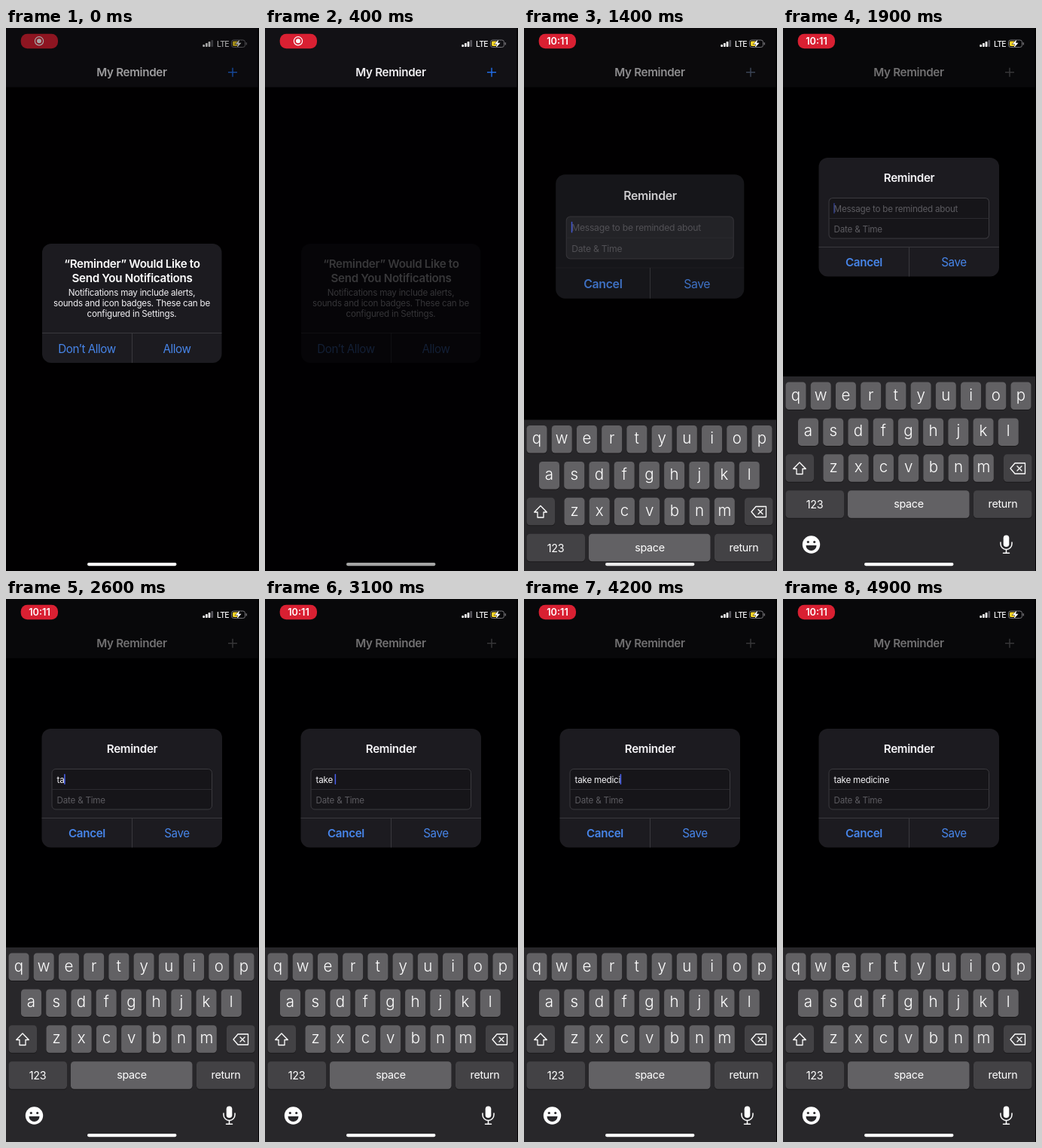
Recreate the animation shown at these times as an HTML page with a canvas. Size 336x720 px, loop 5 s.

```html
<!DOCTYPE html>
<html lang="en">
<head>
<meta charset="utf-8">
<title>My Reminder</title>
<style>
  html, body { margin: 0; width: 100%; height: 100%; overflow: hidden; background: #000; }
  canvas { display: block; width: 336px; height: 720px; }
</style>
</head>
<body>
<canvas id="stage"></canvas>
<script>
const W = 336, H = 720, LOOP = 5000, STEP = 100;
const canvas = document.getElementById('stage');
const ctx = canvas.getContext('2d');
const dpr = window.devicePixelRatio || 1;
canvas.width = W * dpr;
canvas.height = H * dpr;

const BLUE = '#4785e9', PANEL = '#1c1b20', LINE = '#39383d';
const FONT = 'Inter, "Liberation Sans", sans-serif';
const MESSAGE = 'take medicine';
const OPEN_AT = 1244, TYPE_AT = 2430, KEY_MS = 165;

const clamp = (v, a = 0, b = 1) => Math.min(b, Math.max(a, v));
const ramp = (t, a, b) => clamp((t - a) / (b - a));
const mix = (a, b, p) => a + (b - a) * p;
const rgb = (...c) => `rgb(${c.map(Math.round).join(',')})`;
const mixRgb = (a, b, p) => rgb(...a.map((v, i) => mix(v, b[i], p)));

// Critically damped spring from 0 to 1
function spring(ms) {
  const x = Math.max(0, ms) * 0.01826;
  return 1 - (1 + x) * Math.exp(-x);
}

function box(x, y, w, h, r, fill, stroke) {
  ctx.beginPath();
  ctx.roundRect(x, y, w, h, r);
  if (fill) { ctx.fillStyle = fill; ctx.fill(); }
  if (stroke) { ctx.strokeStyle = stroke; ctx.lineWidth = 1; ctx.stroke(); }
}

function disc(x, y, r, fill) {
  ctx.beginPath();
  ctx.arc(x, y, r, 0, Math.PI * 2);
  ctx.fillStyle = fill;
  ctx.fill();
}

function path(points, close) {
  ctx.beginPath();
  points.forEach(([x, y]) => ctx.lineTo(x, y));
  if (close) ctx.closePath();
}

function line(x1, y1, x2, y2, color, width = 1) {
  path([[x1, y1], [x2, y2]]);
  ctx.strokeStyle = color;
  ctx.lineWidth = width;
  ctx.stroke();
}

function text(str, x, y, size, color, { weight = 400, align = 'center', track = 0 } = {}) {
  ctx.font = `${weight} ${size}px ${FONT}`;
  ctx.letterSpacing = track + 'px';
  ctx.textAlign = align;
  ctx.fillStyle = color;
  ctx.fillText(str, x, y);
  return ctx.measureText(str).width;
}

const heading = (str, x, y, color) =>
  text(str, x, y, 15.2, color, { weight: 600, track: -0.33 });
const action = (str, x, y) =>
  text(str, x, y, 15.2, BLUE, { track: -0.45 });
const small = (str, x, y, color, align = 'left') =>
  text(str, x, y, 11.65, color, { align, track: -0.23 });

// Draws with opacity relative to the enclosing layer
function layer(alpha, draw) {
  ctx.save();
  ctx.globalAlpha *= alpha;
  draw();
  ctx.restore();
}

function drawHeader(plus) {
  box(0, 0, 334.5, 78.5, 0, '#121115');
  heading('My Reminder', 167, 64, '#f0eff2');
  line(295, 58.7, 307, 58.7, plus, 1.4);
  line(301, 52.7, 301, 64.7, plus, 1.4);
}

function drawStatus(t) {
  box(19.7, 7.7, 49.3, 19.5, 8.5, '#d92032');
  const clock = ramp(t, 800, 1000);
  layer(1 - clock, () => {
    ctx.beginPath();
    ctx.arc(44, 17.3, 5.6, 0, Math.PI * 2);
    ctx.strokeStyle = '#fff';
    ctx.lineWidth = 1.2;
    ctx.stroke();
    disc(44, 17.3, 3, '#fff');
  });
  layer(clock, () => text('10:11', 44.5, 21.8, 12.7, '#fff', { weight: 600 }));

  for (let i = 0; i < 4; i++) {
    const h = 3 + i * 2;
    box(261.3 + i * 3.7, 25 - h, 2.7, h, 0.7, i < 3 ? '#fff' : '#55545a');
  }
  text('LTE', 280, 24.5, 10.5, '#f4f4f5', { weight: 500, align: 'left', track: -0.75 });

  box(299.5, 16, 18, 9.5, 2.8, null, '#77767a');
  box(301, 17.5, 8, 6.5, 1.4, '#f5d327');
  box(318.7, 19, 1.3, 3.5, 0.6, '#77767a');
  path([[310.5, 15], [304.5, 21.5], [308, 21.5], [306.5, 26.5], [312.5, 19.8], [309, 19.8]], true);
  ctx.strokeStyle = '#111';
  ctx.lineWidth = 1;
  ctx.stroke();
  ctx.fillStyle = '#fff';
  ctx.fill();
}

function drawPermission() {
  box(48, 286, 238.5, 158, 12, PANEL);
  heading('“Reminder” Would Like to', 167.5, 318, '#fff');
  heading('Send You Notifications', 167.5, 337, '#fff');
  ['Notifications may include alerts,', 'sounds and icon badges. These can be', 'configured in Settings.']
    .forEach((s, i) => small(s, 167, 355 + i * 14, '#f2f1f4', 'center'));
  line(48, 404.5, 286.5, 404.5, LINE);
  line(167.5, 404.5, 167.5, 444, LINE);
  action('Don’t Allow', 107.5, 430.5);
  action('Allow', 227, 430.5);
}

// Solid after each key, then a one second blink
function caretAlpha(ms) {
  const p = ms % 1000;
  return ms < 0 ? 1 : p < 500 ? 1 - ramp(p, 400, 480) : ramp(p, 850, 1000);
}

function drawForm(t, open) {
  const settle = ramp(open, 0.7, 1);
  box(47.5, 172, 239.5, 157.5, 12, PANEL);
  heading('Reminder', 167.5, 204, '#f6f5f8');
  box(61, 225.5, 212.5, 53.5, 5, mixRgb([61, 60, 64], [22, 21, 25], ramp(open, 0.5, 1)), '#3b3a3f');
  line(61, 252.5, 273.5, 252.5, '#2c2b30');

  const typed = clamp(1 + Math.floor((t - TYPE_AT) / KEY_MS), 0, MESSAGE.length);
  let width = 0;
  if (typed) width = small(MESSAGE.slice(0, typed), 67.6, 243.5, '#f4f3f6');
  else small('Message to be reminded about', 67.6, 243.5, '#5c5b60');
  const lastKey = typed ? TYPE_AT + (typed - 1) * KEY_MS : 1460;
  layer(caretAlpha(t - lastKey), () => box(67.2 + width, 232, 1.5, 14, 0.7, '#4a62f0'));
  small('Date & Time', 67.6, 270.5, '#5c5b60');

  layer(settle, () => line(47.5, 290.5, 287, 290.5, LINE));
  line(167.5, 290.5, 167.5, 329.5, LINE);
  heading('Cancel', 107.5, 316, BLUE);
  action('Save', 227, 316);
}

function key(x, y, w, fill) {
  box(x, y + 1, w, 36.5, 4.5, '#1a191b');
  box(x, y, w, 36.5, 4.5, fill);
}

function drawKeyboard() {
  const light = '#626164', dark = '#434245';
  box(0, 462, 335, 260, 0, '#28272a');
  ['qwertyuiop', 'asdfghjkl', 'zxcvbnm'].forEach((row, r) => {
    const y = 469.5 + r * 47.9;
    [...row].forEach((ch, i) => {
      const x = [17, 33.5, 67][r] + i * 33.22;
      key(x - 13.5, y, 27, light);
      text(ch, x, y + 24, 20.5, '#fff', { weight: 300 });
    });
  });
  key(3.5, 565.3, 37.5, dark);
  key(293, 565.3, 37.5, dark);
  key(3.5, 613.2, 77.5, dark);
  key(86, 613.2, 161.5, light);
  key(253, 613.2, 77.5, dark);
  const label = { track: -0.3 };
  text('123', 42, 637, 14.3, '#fff', label);
  text('space', 167, 636, 14.3, '#fff', label);
  text('return', 292, 636, 14.3, '#fff', label);

  ctx.lineJoin = ctx.lineCap = 'round';
  ctx.strokeStyle = '#fff';
  ctx.lineWidth = 1.3;
  path([[22, 576], [30.3, 584.5], [26, 584.5], [26, 591.5], [18, 591.5], [18, 584.5], [13.7, 584.5]], true);
  ctx.stroke();
  path([[302, 584], [308, 577], [321.5, 577], [321.5, 591], [308, 591]], true);
  ctx.stroke();
  line(311, 581, 317, 587, '#fff', 1.3);
  line(317, 581, 311, 587, '#fff', 1.3);

  disc(37.5, 685, 11.7, '#fff');
  disc(33.3, 681.5, 1.6, '#28272a');
  disc(41.7, 681.5, 1.6, '#28272a');
  ctx.beginPath();
  ctx.arc(37.5, 686, 7, 0, Math.PI);
  ctx.closePath();
  ctx.fillStyle = '#28272a';
  ctx.fill();

  box(292.7, 672.5, 7.6, 15.5, 3.8, '#fff');
  ctx.beginPath();
  ctx.moveTo(289, 682);
  ctx.lineTo(289, 684);
  ctx.arc(296.5, 684, 7.5, Math.PI, 0, true);
  ctx.lineTo(304, 682);
  ctx.strokeStyle = '#fff';
  ctx.lineWidth = 1.5;
  ctx.stroke();
  line(296.5, 692, 296.5, 696, '#fff', 1.5);
  line(292.5, 696.3, 300.5, 696.3, '#fff', 1.5);
}

function shade(alpha) {
  box(0, 0, W, H, 0, `rgba(0,0,0,${alpha})`);
}

function render(t) {
  const ask = 1 - ramp(t, 200, 450);
  const open = spring(t - OPEN_AT);

  ctx.setTransform(dpr, 0, 0, dpr, 0, 0);
  box(0, 0, W, H, 0, '#010002');
  drawHeader(mixRgb([34, 112, 238], [120, 120, 124], open));
  shade(0.53 * open);
  drawStatus(t);
  shade(0.35 * ramp(ask, 0.2, 1));

  if (ask > 0) layer(ask, drawPermission);

  if (open > 0) {
    const rest = 1 - open;
    layer(clamp(open * 1.05), () => {
      ctx.translate(167.25, 250.7 + 115 * rest);
      ctx.scale(1 + 0.2 * rest, 1 + 0.2 * rest);
      ctx.translate(-167.25, -250.7);
      drawForm(t, open);
    });
    layer(1, () => {
      ctx.translate(0, 258 * rest);
      drawKeyboard();
    });
  }

  const bar = mix(165, 255, Math.max(ramp(ask, 0.2, 1), open));
  box(108, 709, 118.5, 4.2, 2.1, rgb(bar, bar, bar));
}

const start = performance.now();
function tick() {
  const t = (performance.now() - start) % LOOP;
  render(Math.floor(t / STEP) * STEP);
  requestAnimationFrame(tick);
}
tick();
</script>
</body>
</html>
```
